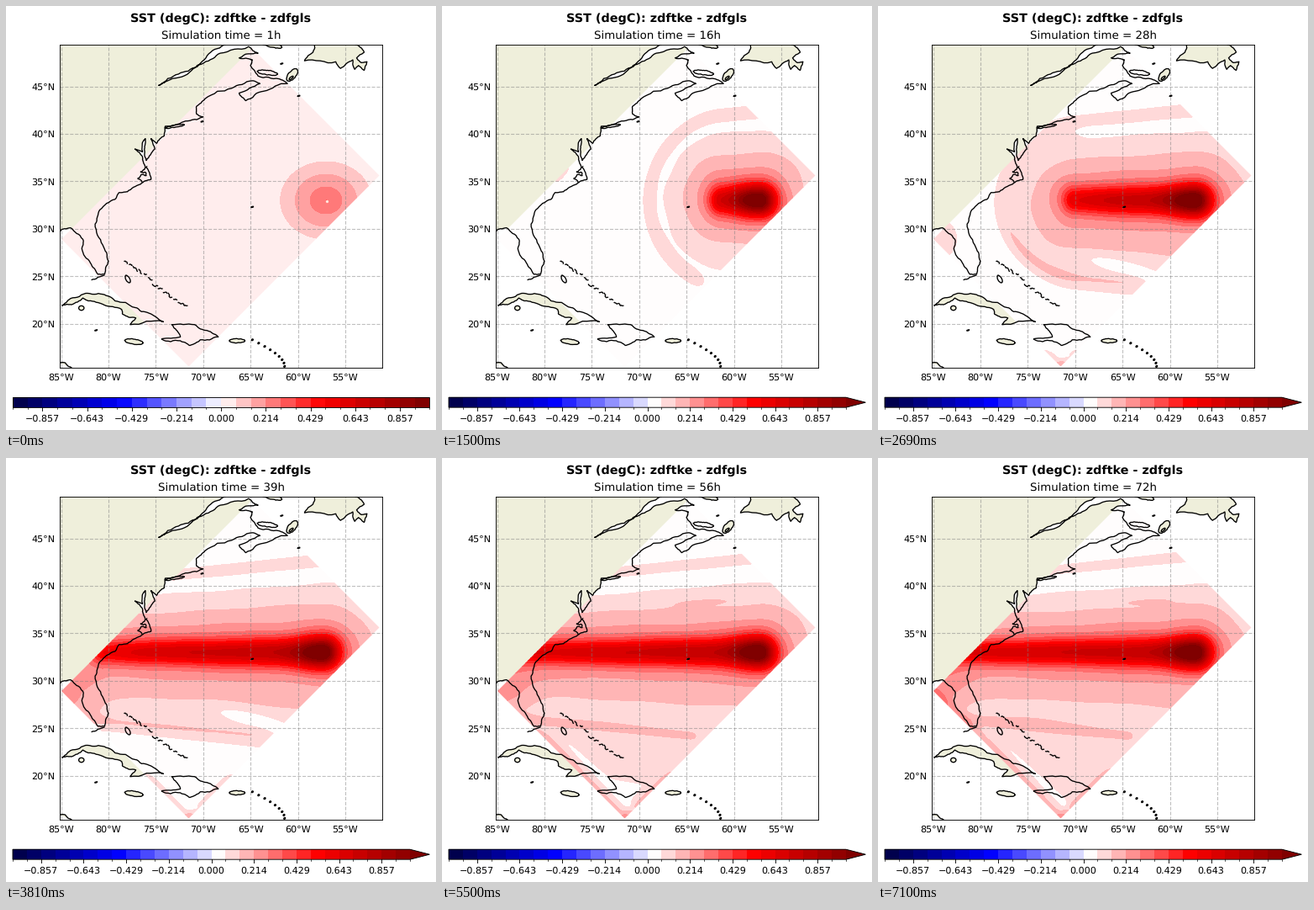
Recreate the animation shown at these times as a matplotlib script. Size 512 px wide and 504 px high, loop 7.2 s.

```python
import numpy as np
import matplotlib.pyplot as plt
from matplotlib.animation import FuncAnimation
from matplotlib.collections import LineCollection
from matplotlib.patches import Polygon, Rectangle

W, H, DPI = 512, 504, 80
LOOP, STEP, HOURS = 7200, 40, 72
FIRST_EXTENDED = 7          # hour from which the maximum passes 1
LEFT, RIGHT, TOP, BOTTOM = 64.2, 448.2, 46.2, 430.2
DEG = 11.28                 # pixels per degree

plt.rcParams["font.family"] = "DejaVu Sans"
plt.rcParams["text.hinting"] = "none"
rng = np.random.default_rng(4)
seismic = plt.get_cmap("seismic")


def lon(x):
    return (np.asarray(x) - 65.5) / DEG - 85


def lat(y):
    return 45 - (np.asarray(y) - 95.6) / DEG


fig = plt.figure(figsize=(W / DPI, H / DPI), dpi=DPI, facecolor="white")
ax = fig.add_axes([LEFT / W, 1 - BOTTOM / H, (RIGHT - LEFT) / W, (BOTTOM - TOP) / H])
ax.set(xlim=(lon(LEFT), lon(RIGHT)), ylim=(lat(BOTTOM), lat(TOP)))
ax.set_xticks(range(-85, -54, 5), [f"{-d}°W" for d in range(-85, -54, 5)])
ax.set_yticks(range(20, 46, 5), [f"{d}°N" for d in range(20, 46, 5)])
ax.tick_params(length=0, pad=5, labelsize=10)
ax.tick_params(axis="x", pad=5.6)
ax.grid(color="gray", alpha=0.5, lw=1, ls="--", zorder=4)
for line in ax.get_xgridlines() + ax.get_ygridlines():
    line.set_zorder(4)
for spine in ax.spines.values():
    spine.set_zorder(5)

fig.text(0.5, 1 - 18.5 / H, "SST (degC): zdftke - zdfgls", size=12.9,
         weight="bold", ha="center", va="baseline")
title = fig.text(256.5 / W, 1 - 40 / H, "", size=12, ha="center", va="baseline")

# ---------- coastlines: key points joined by fractal shores ----------
shores = []


def roughen(points, amount=0.1, rounds=3):
    """Repeatedly add a randomly displaced midpoint to every segment."""
    p = np.array(points, float)
    for _ in range(rounds):
        step = np.diff(p, axis=0)
        normal = np.column_stack([-step[:, 1], step[:, 0]])
        mid = p[:-1] + step / 2 + normal * rng.uniform(-amount, amount, (len(step), 1))
        out = np.empty((2 * len(p) - 1, 2))
        out[0::2], out[1::2] = p, mid
        p = out
    return p


def shore(points, corners=()):
    """Draw a rough shore line; the land fill may reach on to some corners."""
    p = roughen(points)
    shores.append(p)
    fill = np.vstack([p, *corners])
    ax.add_patch(Polygon(fill, fc="#efefdb", ec="none", zorder=0))


def island(x, y, rx, ry, tilt=0):
    a = np.linspace(0, 2 * np.pi, 13)
    turn = np.exp(1j * np.radians(tilt))
    z = x + 1j * y + turn * (rx * np.cos(a) + 1j * ry * np.sin(a))
    shore(np.column_stack([z.real, z.imag]))


south = [(-85.2, 29.7), (-84, 30.1), (-82.7, 28.9), (-82.8, 27.9), (-81.9, 26.4),
         (-81.1, 25.2), (-80.4, 25.2), (-80, 26.6), (-80.6, 28.3), (-81.4, 30.5),
         (-80.9, 32), (-79.3, 33.1), (-78.9, 33.8), (-78, 33.9), (-76.6, 34.7),
         (-75.5, 35.2), (-75.8, 36.2), (-76.3, 37)]
bays = [(-76.4, 37.6), (-77.2, 38.4), (-76.4, 38.1), (-76.4, 39.1), (-76.1, 39.5),
        (-76.2, 38.4), (-76, 37.2), (-75.1, 38.4), (-75.5, 39.5), (-74.9, 39),
        (-74.1, 39.8), (-74, 40.8)]
north = [(-72, 41.3), (-70.7, 41.5), (-70, 41.8), (-70.7, 42.1), (-70.7, 42.9),
         (-69.8, 43.7), (-67, 44.8), (-64.8, 45.6), (-64, 45.3), (-66.2, 44.3),
         (-65.5, 43.5), (-63.6, 44.5), (-61.1, 45.3), (-62, 45.8), (-64.2, 46.1),
         (-65, 47.2), (-64.8, 47.8), (-66.2, 48), (-64.2, 48.5), (-65.2, 49.2)]
river = [(-68.2, 48.5), (-69.9, 47.5), (-71.2, 46.7), (-73.5, 45.7), (-74.7, 45.1),
         (-72.6, 46.3), (-70.6, 47.1), (-69.2, 48.6), (-67.4, 49.6)]
shore(south + bays + north + river, [(-86, 49.6), (-86, 29.7)])

# Cuba, Hispaniola, Newfoundland, Honduras
shore([(-84.9, 21.9), (-84.2, 22.5), (-82.4, 23.2), (-80.6, 23.1), (-79.3, 22.4),
       (-77.2, 21.7), (-75.7, 21.1), (-74.2, 20.2), (-77.7, 19.9), (-77.1, 20.6),
       (-78.5, 21), (-78.6, 21.5), (-80.5, 22), (-82.1, 22.4), (-82.7, 22.7),
       (-83.9, 22), (-84.9, 21.9)])
shore([(-74.4, 18.4), (-72.4, 18.6), (-72.8, 19.3), (-73.3, 19.9), (-70.9, 19.9),
       (-69.8, 19.3), (-68.4, 18.6), (-70.3, 18.3), (-71.4, 17.7), (-72.4, 18.2),
       (-74.4, 18.4)])
shore([(-58.2, 49.6), (-58.4, 48.6), (-59.3, 47.7), (-56, 47.6), (-55.5, 46.9),
       (-54.2, 47.8), (-54, 46.8), (-53.6, 47.2), (-53, 46.7), (-52.7, 47.6),
       (-53.3, 47.5), (-53.8, 48), (-53, 48.6), (-53.6, 49.3), (-54.5, 49.6)])
shore([(-85.2, 15.9), (-84.6, 15.9), (-83.8, 15.3)])

island(-73, 40.8, 1.05, 0.12, 10)
island(-63.2, 46.45, 1.1, 0.25, -8)
island(-60.6, 46.2, 0.8, 0.4, 50)
island(-60.7, 45.9, 0.28, 0.1, 40)
island(-62.9, 49.45, 1.3, 0.3, -15)
island(-77.3, 18.1, 1.0, 0.26, -8)
island(-66.4, 18.2, 0.85, 0.22)
island(-82.85, 21.65, 0.28, 0.24)
island(-77.95, 24.7, 0.45, 0.2, -60)

# sounds, the Bahamas chain, the Antilles arc and lone islets
shores.append(roughen([(-76.4, 34.9), (-76.9, 35.3), (-76, 35.6), (-76.6, 36),
                       (-75.9, 36.6)], 0.3))
shores.append(roughen([(-81.8, 24.6), (-80.4, 25.1)]))
for s in np.linspace(0, 1, 13):
    x, y = -78.2 + 6.3 * s, 26.6 - 4.8 * s + rng.uniform(-0.35, 0.35)
    dx, dy = rng.uniform(0.15, 0.3), rng.uniform(-0.3, 0.05)
    shores.append(roughen([(x - dx, y - dy), (x + dx, y + dy)], 0.3))
for s in np.linspace(0, 1, 9):
    island(-64.8 + 3.4 * np.sin(s * np.pi / 2), 18.3 - 2.8 * s, 0.1, 0.07, 40)
for x, y in [(-81.3, 19.3), (-64.8, 32.3), (-59.9, 44), (-70.1, 41.3), (-61.7, 47.4)]:
    island(x, y, 0.14, 0.04, 15)
ax.add_collection(LineCollection(shores, colors="k", linewidths=1.2, zorder=3),
                  autolim=False)

# ---------- temperature difference field, in pixel space ----------
X, Y = np.meshgrid(np.linspace(LEFT, RIGHT, 220), np.linspace(TOP, BOTTOM, 220))
LON, LAT = lon(X), lat(Y)
LEVELS = np.arange(15) / 14
corners = np.array([(66, 277), (293, 50), (444.5, 201.5), (217.5, 428.5)])
domain = Polygon(np.column_stack([lon(corners[:, 0]), lat(corners[:, 1])]),
                 transform=ax.transData)
from_sw = (211 - (Y - X)) / np.sqrt(2)
from_se = (646 - (X + Y)) / np.sqrt(2)
from_nw = (X + Y - 343) / np.sqrt(2)


def ramp(v, a, b):
    s = np.clip((v - a) / (b - a), 0, 1)
    return s * s * (3 - 2 * s)


def bump(u, v=0):
    return np.exp(-u ** 2 - v ** 2)


def field(t):
    grown = min(1, (t - 1) / 6) ** 0.6
    cone = 0.29 * np.clip(1 - np.hypot((X - 381) / 1.18, Y - 231) / 61, 0, 1)

    # wake: distance to the track swept so far, fanning out eastward
    head = min(378, 393 - 61 * ((t - 1) / 15) ** 1.63)
    q = (Y - 231) / (1 + 0.001 * (X - 250))
    dx = 1.1 * np.maximum(0, head - X) + 0.9 * np.maximum(0, X - 378)
    dist = np.hypot(dx, q)
    side = 0.5 + 0.5 * q / (dist + 1)       # 0 north, 1 south
    width = 63 + (18 * ramp(t, 16, 28) - 1) * side
    core = 0.5 * (0.8 + 0.2 * ramp(X - head, -10, 60)) + 0.0006 * (X - 310)
    f = core * bump(dist / 16) + 0.27 * np.exp(-(dist / width) ** (2 - 0.5 * side))
    f += 0.35 * bump((X - 374) / 27, (Y - 231) / 21)
    f += 0.008 * np.sin(X / 23 + t * 0.15) * np.sin(Y / 9 - X / 60) * bump(dist / 75)

    # outer ring, closed up west of the head, and the gap in its southern half
    radius = 95 + 0.14 * np.maximum(0, t - 16) * (1 - side)
    east_cut = 1 - ramp(X, 295, 325) * (q > 0)
    f += 0.07 * ramp(t, 8, 15) * bump((dist - radius) / 9.5) * east_cut
    f += 0.03 * ramp(t, 18, 28) * bump((dist - 80) / 14) * ramp(head - X, -20, 20)
    gap = ramp(t, 18, 27) * (1 - ramp(t, 38, 62))
    f -= 0.1 * gap * bump((X - 292) / 44, (Y - 310 - 0.25 * (X - 292)) / 9)

    # late warming in the south and along the borders
    f += 0.065 * ramp(t, 38, 62) * ramp(q, 80, 140)
    f += 0.035 * ramp(t, 48, 66) * bump((X - 185) / 65, (Y - 312 - 0.1 * (X - 185)) / 10)
    f += 0.03 * ramp(t, 44, 56) * bump((X - 315) / 48, (Y - 170 + 0.05 * (X - 315)) / 5)
    reach = ramp(Y, 424 - 3 * (t - 20), 440 - 3 * (t - 20)) * ramp(t, 18, 26)
    f += 0.1 * reach * (bump(from_sw / 7) + bump(from_se / 6) * ramp(Y, 350, 390))
    f -= 0.035 * reach * bump((from_sw - 15) / 4) * ramp(Y, 325, 360)
    f += 0.11 * ramp(t, 18, 26) * bump(np.hypot(X - 66, Y - 277) / 38)
    f += 0.09 * ramp(t, 10, 14) * (1 - ramp(t, 18, 26)) * bump(from_nw / 6, (X - 143) / 16)
    return np.maximum(0.002, (1 - grown) * cone + grown * f)


# ---------- colour bars ----------
def colours(extended):
    return [seismic(i / (27 + extended)) for i in range(28 + extended)]


def colour_bar(extended):
    bar = fig.add_axes([0, 0, 1, 1])
    bar.set(xlim=(0, W), ylim=(H, 0))
    bar.axis("off")
    x0, x1, y0, y1 = 8, 481 if extended else 504.4, 465.2, 477.2
    step, shades, mid = (x1 - x0) / 28, colours(extended), (y0 + y1) / 2
    for i in range(28):
        bar.add_patch(Rectangle((x0 + i * step, y0), step, y1 - y0, fc=shades[i],
                                ec="none", antialiased=False))
    outline = [(x0, y0), (x1, y0), (x1, y1), (x0, y1)]
    if extended:
        tip = (504.4, mid)
        bar.add_patch(Polygon([(x1, y0), tip, (x1, y1)], fc=shades[-1], ec="none"))
        outline.insert(2, tip)
    bar.add_patch(Polygon(outline, fc="none", ec="k", lw=0.8))
    for k in range(-14, 15):
        x, major = x0 + (k + 14) * step, k % 3 == 0
        bar.plot([x, x], [y1, y1 + (3.9 if major else 2.2)], "k",
                 lw=0.8 if major else 0.6)
        if major:
            bar.text(x, 490, f"{k / 14:.3f}".replace("-", "\u2212"), size=10,
                     ha="center", va="center_baseline")
    return bar


bars = [colour_bar(False), colour_bar(True)]
core_dot, = ax.plot(lon(381.5), lat(231.5), "o", ms=3, mec="none", mfc="#ffe6dc", zorder=2)
shown = {}


def update(frame):
    hour = int((frame * STEP + STEP / 2) * HOURS / LOOP) + 1
    if hour in shown:
        return
    while shown:
        shown.popitem()[1].remove()
    extended = hour >= FIRST_EXTENDED
    f = field(hour)
    if not extended:
        f = np.minimum(f, 0.999)
    cs = ax.contourf(LON, LAT, f, levels=LEVELS, colors=colours(extended)[14:],
                     extend="max" if extended else "neither", zorder=1)
    cs.set_clip_path(domain)
    shown[hour] = cs
    core_dot.set_visible(hour == 1)
    for i, bar in enumerate(bars):
        bar.set_visible(i == extended)
    title.set_text(f"Simulation time = {hour}h")


anim = FuncAnimation(fig, update, frames=LOOP // STEP, interval=STEP, repeat=True,
                     blit=False)
plt.show()
```
